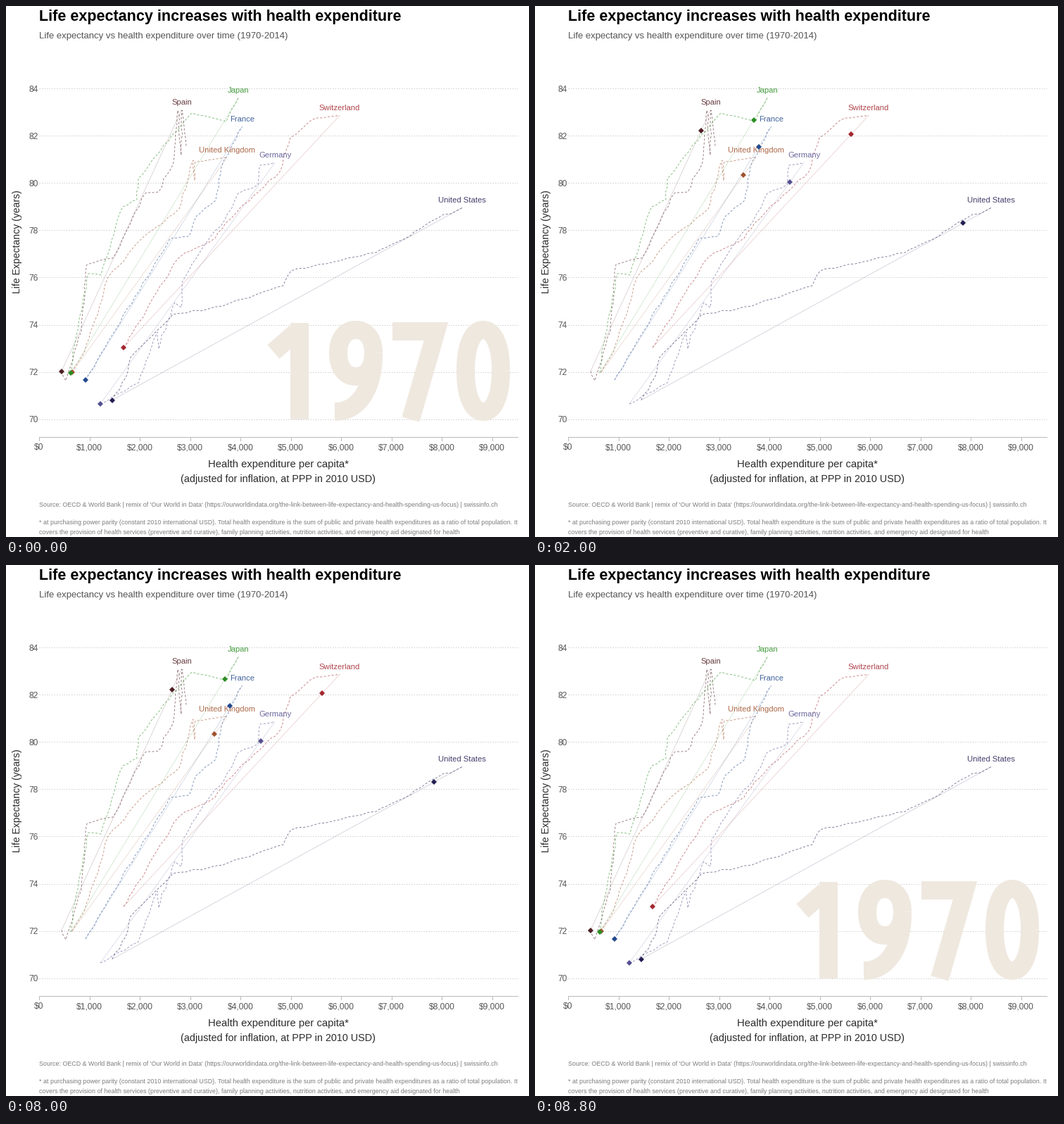
Recreate the animation shown at these times as a matplotlib script. Size 743 px wide and 754 px high, loop 10 s.

```python
import matplotlib.pyplot as plt
import numpy as np
from matplotlib.animation import FuncAnimation

W, H = 743, 754
STEP_MS, FRAMES = 200, 50
RISE, FALL, MOVE = 6, 39, 5   # last still steps and length of a move
LEFT, RIGHT, BASE = 47, 727, 612
GREY, DARK, PALE = "#555555", "#2b2b2b", "#7d7d7d"

plt.rcParams["font.family"] = "Liberation Sans"
fig = plt.figure(figsize=(W / 72, H / 72), dpi=72, facecolor="white")  # 1 pt = 1 px
ax = fig.add_axes([0, 0, 1, 1])
ax.set(xlim=(0, W), ylim=(H, 0))
ax.axis("off")
rng = np.random.default_rng(1970)


def label(x, y, s, size, color=GREY, ha="left", **kw):
    ax.text(x, y, s, fontsize=size, color=color, ha=ha, va="baseline", **kw)


def chart_frame():
    for i, age in enumerate(range(84, 69, -2)):
        y = 117 + 67.1 * i
        ax.plot([LEFT, RIGHT], [y, y], color="#cfcfcf", lw=1, dashes=(1.5, 2), zorder=1)
        label(LEFT - 1, y + 4.5, str(age), 12, ha="right")
    ax.plot([LEFT, RIGHT], [BASE, BASE], color="#b9b9b9", lw=1)
    for k in range(10):
        x = LEFT + 71.5 * k
        ax.plot([x, x], [BASE, BASE + 5], color="#b9b9b9", lw=1)
        label(x, 630, f"${k * 1000:,}", 12, ha="center")


def captions():
    label(47, 21.5, "Life expectancy increases with health expenditure", 21.5,
          "black", weight="bold")
    label(47, 46, "Life expectancy vs health expenditure over time (1970-2014)", 13.1)
    label(387, 655, "Health expenditure per capita*", 14.8, DARK, "center")
    label(387, 676, "(adjusted for inflation, at PPP in 2010 USD)", 14.4, DARK, "center")
    label(20, 335, "Life Expectancy (years)", 14, DARK, "center", rotation=90,
          rotation_mode="anchor")
    label(47, 711, "Source: OECD & World Bank | remix of 'Our World in Data' "
          "(https://ourworldindata.org/the-link-between-life-expectancy-and-health-"
          "spending-us-focus) | swissinfo.ch", 8.92, PALE)
    label(47, 736.5, "* at purchasing power parity (constant 2010 international USD). "
          "Total health expenditure is the sum of public and private health expenditures "
          "as a ratio of total population. It", 8.86, PALE)
    label(47, 749.5, "covers the provision of health services (preventive and curative), "
          "family planning activities, nutrition activities, and emergency aid "
          "designated for health", 8.86, PALE)


def arc(cx, cy, rx, ry, start=0, stop=360, n=2.2):
    """Points on a superellipse between two angles in degrees."""
    a = np.radians(np.linspace(start, stop, 60))
    c, s = np.cos(a), np.sin(a)
    return list(zip(cx + rx * np.sign(c) * abs(c) ** (2 / n),
                    cy + ry * np.sign(s) * abs(s) ** (2 / n)))


# Centre lines of the heavy numerals, in a cell 90 wide and 142 high
DIGITS = {
    "0": [arc(43, 71, 25, 58)],
    "1": [[(52, 140), (52, 3)], [(15, 44), (46, 17)]],
    "2": [arc(38, 42, 26, 29, -155, 20) + [(24, 128), (81, 128)]],
    "4": [[(57.5, 140), (57.5, 3)], [(85, 99.5), (20, 99.5), (55, 15)]],
    "7": [[(4, 15), (66, 15), (30, 140)]],
    "9": [arc(42, 46, 25, 33), arc(12, 46, 55, 83, 0, 90)],
}


def big_year(year):
    strokes = []
    for i, ch in enumerate(year):
        for pts in DIGITS[ch]:
            x, y = np.array(pts).T
            strokes += ax.plot(365 + 90 * i + x, 447 + y, color="#efe8df", lw=26,
                               solid_capstyle="butt", solid_joinstyle="miter", zorder=1.5)
    return strokes


def wander(keys):
    """Key points joined by short, slightly uneven yearly steps."""
    pts = [keys[0]]
    for a, b in zip(keys, keys[1:]):
        a, b = np.array(a), np.array(b)
        n = int(np.ceil(np.hypot(*(b - a)) / 11))
        pts += [a + (b - a) * k / n + rng.normal(0, 0.9, 2) for k in range(1, n)] + [b]
    return pts


def country(name, color, *keys, end=None):
    """Dashed history, straight trend, name and the moving diamond."""
    start, end = keys[0], end or keys[-1]
    ax.plot(*zip(*wander(keys)), color=color, lw=0.95, dashes=(3.2, 2.6), alpha=0.58,
            zorder=3)
    ax.plot(*zip(start, end), color=color, lw=0.8, alpha=0.22, zorder=2)
    label(end[0], end[1] - 7.5, name, 11.2, color, "center", alpha=0.85, zorder=4)
    dot, = ax.plot(*start, "D", ms=6.3, color=color, mew=0, zorder=5)
    return dot, np.array(start), np.array(end)


chart_frame()
captions()
first, last = big_year("1970"), big_year("2014")
movers = [
    country("United Kingdom", "#a0522d", (94, 520), (112, 490), (126, 447), (145, 385),
            (195, 328), (246, 288), (266, 219), (268, 248), (269, 221), (314, 215.5)),
    country("Spain", "#4f1f24", (79, 518.5), (85, 532), (107, 462), (115, 367),
            (152, 358), (199, 265), (217, 264), (238, 222), (244, 148), (249, 212),
            (250, 148), (256, 200), end=(249.5, 147.5)),
    country("Japan", "#2a8d22", (92, 521), (98, 480), (117, 380), (135, 382),
            (166, 285), (186, 275), (188, 245), (236, 183), (264, 152), (313, 164),
            (330, 130.5)),
    country("France", "#23498c", (113, 531), (233, 330), (260, 327), (270, 299),
            (298, 276), (309, 220), (335.5, 171.5)),
    country("Germany", "#55508f", (134, 565), (188, 535), (215, 463), (217, 487),
            (240, 421), (249, 428), (251, 390), (280, 342), (310, 305), (330, 266),
            (358, 254), (361, 226), (382, 222.5)),
    country("Switzerland", "#a3272f", (167, 485), (180, 464), (215, 405), (239, 365),
            (255, 350), (297, 330), (312, 308), (390, 234), (404, 187), (440, 159),
            (474, 155.5)),
    country("United States", "#231f52", (151, 559.5), (170, 528), (177, 499),
            (237, 438), (308, 426), (394, 397), (405, 376), (526, 350), (556, 335),
            (605, 305), (648, 286.5)),
]


def ease(t):
    t = min(max(t, 0), 1)
    return 2 * t * t if t < 0.5 else 1 - 2 * (1 - t) ** 2


def update(i):
    p = ease((i - RISE) / MOVE) - ease((i - FALL) / MOVE)
    for dot, a, b in movers:
        x, y = a + p * (b - a)
        dot.set_data([x], [y])
    for stroke in first:
        stroke.set_visible(i <= RISE or i >= FALL + MOVE)
    for stroke in last:
        stroke.set_visible(RISE + MOVE <= i <= FALL)


anim = FuncAnimation(fig, update, frames=FRAMES, interval=STEP_MS, repeat=True,
                     repeat_delay=0, blit=False)
plt.show()
```
